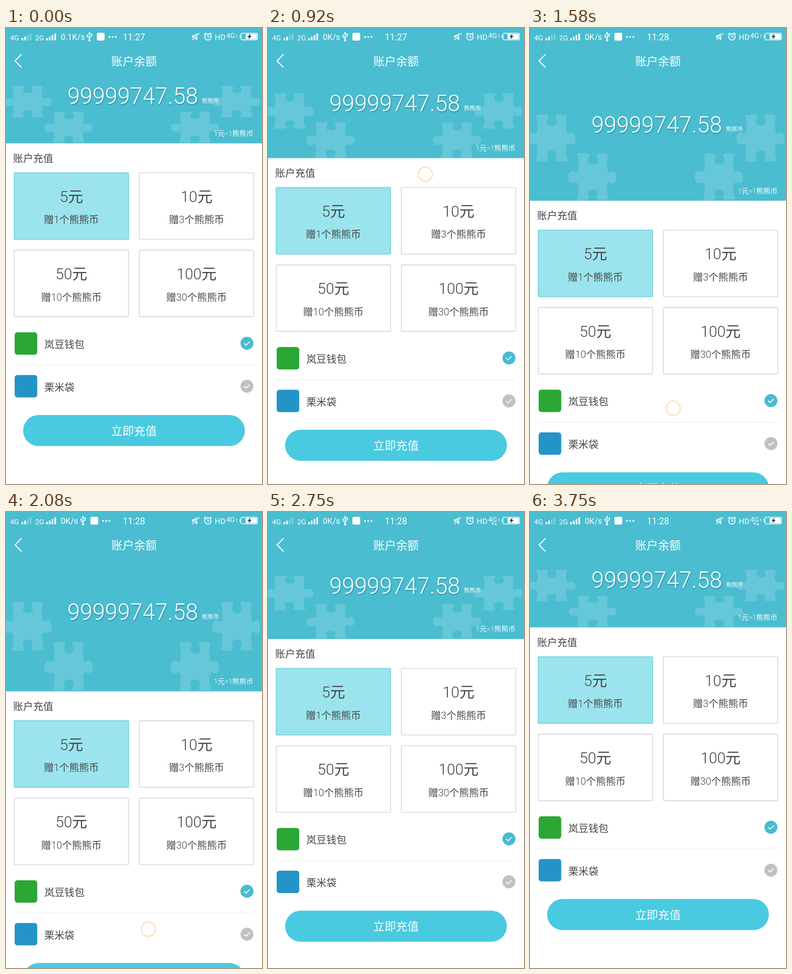
An HTML page that plays this animation: 561x998 px, repeating every 3830 ms.

```html
<!DOCTYPE html>
<html lang="zh-CN">
<head>
<meta charset="utf-8">
<title>账户余额</title>
<style>
html, body { margin: 0; width: 100%; height: 100%; overflow: hidden; background: #fff; }
svg { display: block; width: 100%; height: 100%; }
text { font-family: Roboto, "Noto Sans CJK SC", "Noto Sans CJK", sans-serif; font-weight: 300; }
.bar text { font-weight: 400; }
#amount { filter: drop-shadow(1px 2px 1.5px rgba(0, 60, 75, .38)); }
</style>
</head>
<body>
<svg viewBox="0 0 561 998" xmlns="http://www.w3.org/2000/svg">
  <defs>
    <path id="piece" fill="#fff" fill-opacity=".15" d="M19 2Q30 0 42 1C48 2 47 6 45 10C40 20 46 26 54 26C62 26 68 20 63 10C61 5 61 2 66 1Q78-1 87 3C84 15 84 30 86 40C88 46 92 43 95 42C102 40 106 48 106 56C106 66 101 72 95 70C91 68 87 66 86 72C83 84 85 96 89 107Q76 110 66 108C60 107 61 103 63 98C66 90 62 84 54 84C46 84 40 90 44 98C46 104 46 108 41 109Q30 111 18 108C22 96 23 84 21 72C20 67 16 68 12 70C5 72 0 66 0 56C0 46 5 40 12 42C16 44 20 46 21 41C23 28 23 14 19 2Z"/>
    <g id="tick"><circle r="14.2"/><path d="M-6 0L-1.8 4.2L6-3.6" fill="none" stroke="#fff" stroke-width="2"/></g>
  </defs>
  <rect width="561" height="998" fill="#fff"/>
  <g id="cover">
    <rect width="561" height="252.5" fill="#4abdd0"/>
    <g id="pieces"></g>
  </g>

  <g class="bar" fill="#fff">
    <g id="signal"></g>
    <text x="9" y="27" font-size="15.5">4G</text>
    <text x="64" y="27" font-size="15.5">2G</text>
    <text id="speed" x="120" y="26" font-size="18"></text>
    <g id="tray">
      <path d="M169 12V27M169 23L164.500 19.500V16M169 21L173.500 17.500V14" fill="none" stroke="#fff" stroke-width="1.7"/>
      <path d="M169 8L172 13H166Z"/>
      <circle cx="169" cy="27" r="2.4"/><circle cx="164.500" cy="16" r="1.8"/><rect x="172" y="12.500" width="3.200" height="3.200"/>
      <rect x="185" y="10.500" width="17" height="17" rx="3"/>
      <circle cx="212.500" cy="19.500" r="2"/><circle cx="219.500" cy="19.500" r="2"/><circle cx="226.500" cy="19.500" r="2"/>
    </g>
    <text id="clock" x="256" y="27" font-size="19.6"></text>
    <path d="M408 16H412L419 11V27L412 22H408Z"/>
    <path d="M407 27L424 11" stroke="#4abdd0" stroke-width="4"/>
    <path d="M408 27L424 11" stroke="#fff" stroke-width="1.6"/>
    <g fill="none" stroke="#fff" stroke-width="1.8">
      <circle cx="442.500" cy="19.500" r="7"/>
      <path d="M442.500 15V20H446M434 14L438 10.500M451 14L447 10.500"/>
    </g>
    <text x="457.500" y="25.500" font-size="17">HD</text>
    <text x="482.500" y="21.500" font-size="15.500">4G</text>
    <text x="503" y="22" font-size="10">1</text>
    <path id="arrows" d="M489 24H495L492 28.500ZM496 28.500H502L499 24Z"/>
    <rect x="515" y="11.500" width="36" height="14.500" rx="3" fill="none" stroke="#fff" stroke-width="1.5"/>
    <rect x="512" y="15.500" width="2" height="6.500"/>
    <rect x="525" y="13" width="24.500" height="11.500" rx="1"/>
    <path d="M536 12.500L529 19.500H533L531 25L538 17.500H534Z" fill="#222"/>
  </g>
  <path d="M34 57.500L20 72L34 86.500" fill="none" stroke="#fff" stroke-width="2.4"/>
  <text x="280.500" y="82" font-size="25" text-anchor="middle" fill="#fff">账户余额</text>

  <g id="balance" fill="#fff">
    <text id="amount" x="134.500" y="166" font-size="49.5">99999747.58</text>
    <text x="429.500" y="163.500" font-size="12.500">熊熊币</text>
  </g>

  <g id="sheet" fill="#444">
    <text x="542" y="236" font-size="15.300" text-anchor="end" fill="#fff">1元=1熊熊币</text>
    <text x="15.500" y="292.500" font-size="22">账户充值</text>
    <g id="cards"></g>
    <rect x="19" y="666" width="49.500" height="49" rx="6" fill="#2ba735"/>
    <text x="84" y="699.500" font-size="22">岚豆钱包</text>
    <use href="#tick" x="528" y="690" fill="#49bbd0"/>
    <path d="M18 737.500H542" stroke="#eee" stroke-width="1.300"/>
    <rect x="19" y="759.500" width="49.500" height="49" rx="6" fill="#2494c7"/>
    <text x="84" y="793.500" font-size="22">栗米袋</text>
    <use href="#tick" x="528" y="784" fill="#c1c1c1"/>
    <rect x="37.500" y="847" width="486" height="68" rx="34" fill="#49cae0"/>
    <text x="280.500" y="891" font-size="25" text-anchor="middle" fill="#fff">立即充值</text>
  </g>

  <g id="touch">
    <circle r="16" fill="none" stroke="#f9dca8" stroke-opacity=".35" stroke-width="4"/>
    <circle r="15" fill="#fff" fill-opacity=".65" stroke="#fae0b4" stroke-width="2"/>
  </g>
</svg>
<script>
const $ = id => document.getElementById(id);
const LOOP = 3830, STEP = 1000 / 12, HEAD = 252.5;
const RELEASE = 2640, RETURN = 250;

// Drag path: time, finger x, finger y, pull distance
const drag = [
  [660, 352, 146, 1],
  [917, 345, 320, 32.3],
  [1250, 328, 643, 89.5],
  [1583, 314, 832, 125.5],
  [2080, 312, 913, 140],
  [2583, 311, 940, 144.5],
  [2640, 311, 941, 145]
];

function slope(i, k) {
  const a = drag[Math.max(i - 1, 0)], b = drag[Math.min(i + 1, drag.length - 1)];
  return (b[k] - a[k]) / (b[0] - a[0]);
}

function along(t, k) {
  let i = 0;
  while (i < drag.length - 2 && t >= drag[i + 1][0]) i++;
  const a = drag[i], b = drag[i + 1], h = b[0] - a[0];
  const u = (t - a[0]) / h, v = 1 - u;
  return v * v * (1 + 2 * u) * a[k] + u * u * (3 - 2 * u) * b[k]
    + h * u * v * (v * slope(i, k) - u * slope(i + 1, k));
}

function pull(t) {
  if (t < drag[0][0]) return 0;
  if (t < RELEASE) return along(t, 3);
  return 145 * Math.max(0, 1 - (t - RELEASE) / RETURN) ** 3;
}

function card(x, y, price, bonus, on) {
  const line = on ? "#62cddd" : "#d6d6d6";
  const frame = (grow, width, alpha, fill) =>
    `<rect x="${x - grow}" y="${y - grow}" width="${250 + 2 * grow}" height="${145 + 2 * grow}" rx="1.5"
      fill="${fill}" stroke="${line}" stroke-width="${width}" stroke-opacity="${alpha}"/>`;
  const label = (dy, size, s) =>
    `<text x="${x + 125}" y="${y + dy}" font-size="${size}" text-anchor="middle">${s}</text>`;
  return frame(0.5, 3, 0.35, "none") + frame(0, 1.3, 1, on ? "#9be4ed" : "#fff")
    + label(63.5, 33, price + "元") + label(110, 21.7, `赠${bonus}个熊熊币`);
}

$("cards").innerHTML = card(18.3, 317.2, 5, 1, true) + card(292.6, 317.2, 10, 3)
  + card(18.3, 486.5, 50, 10) + card(292.6, 486.5, 100, 30);

$("pieces").innerHTML = [[-6, 126], [84, 182.5], [361, 182.5], [452, 126]]
  .map(([x, y]) => `<use href="#piece" transform="translate(${x} ${y}) scale(1 .636)"/>`).join("");

function bars(x, lit) {
  return [5, 8, 11.5, 15].map((h, i) =>
    `<rect x="${x + i * 6}" y="${27 - h}" width="3.6" height="${h}" opacity="${i < lit ? 1 : 0.3}"/>`).join("");
}
$("signal").innerHTML = bars(34, 2) + bars(88, 4);

function draw(time) {
  const t = Math.min(45, Math.floor((time + 3.4) / STEP)) * STEP;
  const d = pull(t), busy = t < 320;
  const touching = t >= drag[0][0] && t < RELEASE;

  $("cover").setAttribute("transform", `scale(1 ${(HEAD + d) / HEAD})`);
  $("balance").setAttribute("transform", `translate(0 ${d / 2})`);
  $("sheet").setAttribute("transform", `translate(0 ${d})`);

  $("touch").style.display = touching ? "" : "none";
  if (touching) $("touch").setAttribute("transform", `translate(${along(t, 1)} ${along(t, 2)})`);

  $("speed").textContent = busy ? "0.1K/s" : "0K/s";
  $("tray").setAttribute("transform", `translate(${busy ? 14 : 0} 0)`);
  $("clock").textContent = t < 1240 ? "11:27" : "11:28";
  $("arrows").style.display = t < 2740 ? "none" : "";
}

const start = performance.now();
function tick(now) {
  draw(Math.max(0, now - start) % LOOP);
  requestAnimationFrame(tick);
}
draw(0);
requestAnimationFrame(tick);
</script>
</body>
</html>
```
